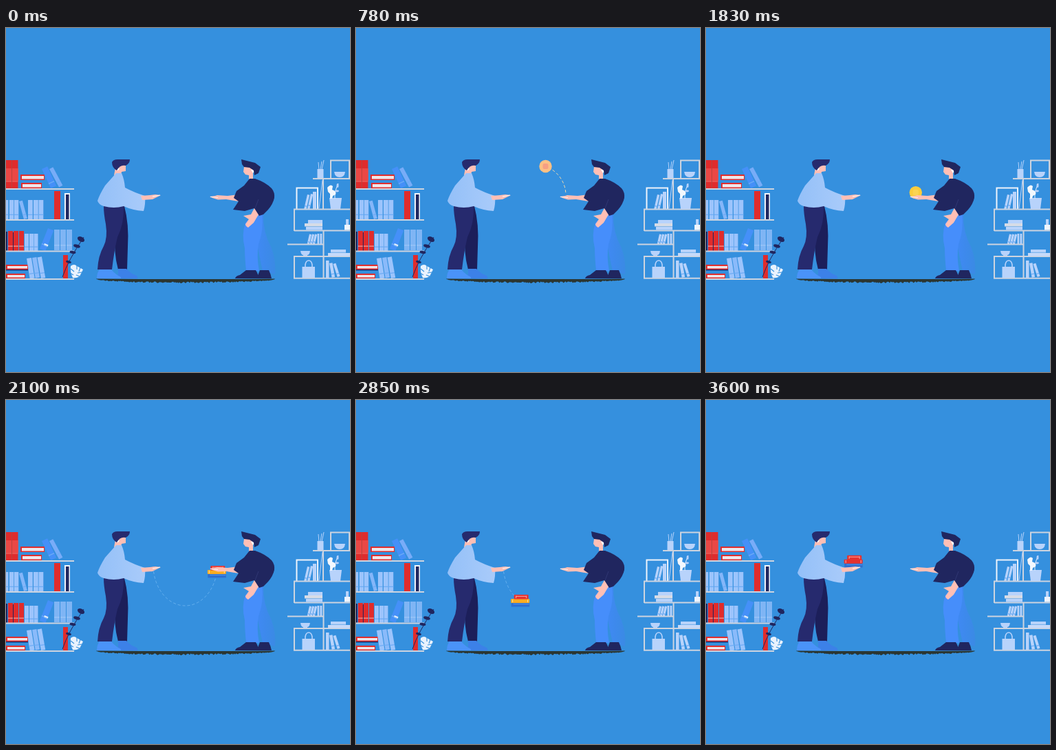
An HTML page for the animation above (3.84 s loop, 500 px wide and 500 px high).

```html
<!DOCTYPE html>
<html lang="en">
<head>
<meta charset="utf-8">
<title>Exchange</title>
<style>
html, body { margin: 0; width: 100%; height: 100%; overflow: hidden; background: #3590de; }
svg { display: block; width: 100%; height: 100%; }
</style>
</head>
<body>
<svg viewBox="0 0 500 500">
  <defs>
    <linearGradient id="sweater"><stop stop-color="#94c0f8"/><stop offset="1" stop-color="#a9cbfa"/></linearGradient>
    <linearGradient id="jeans"><stop stop-color="#4089f4"/><stop offset="1" stop-color="#3a8ae4"/></linearGradient>
  </defs>

  <g id="leftShelf"></g>
  <g id="twig">
    <path d="M82 362Q90 338 113 304" fill="none" stroke="#20265f"/>
    <g fill="#20265f">
      <ellipse cx="109" cy="307" rx="5.5" ry="3.5" transform="rotate(30 109 307)"/>
      <ellipse cx="103" cy="317" rx="5" ry="2.3" transform="rotate(15 103 317)"/>
      <ellipse cx="97" cy="326" rx="4.5" ry="2" transform="rotate(10 97 326)"/>
      <ellipse cx="91" cy="340" rx="4" ry="1.8" transform="rotate(15 91 340)"/>
    </g>
    <path d="M94 346Q99 342 103 346L112 351Q109 357 107 361 102 364 97 363 93 355 94 346Z" fill="#e9f2fd"/>
    <path d="M94 350 99 354M93 356 98 359M103 345 103 351M108 348 106 354M110 355 104 356M107 361 102 359" fill="none" stroke="#3590de" stroke-width="1.1"/>
  </g>

  <g id="rightShelf"></g>
  <g id="plant" fill="#b8d3fb">
    <path d="M470 247H488L486 263H472Z"/>
    <path d="M478 248Q477 238 483 226M473 248Q476 240 470 234" fill="none" stroke="#e9f2fd"/>
    <path d="M467 232Q472 226 475 230L474 235Q481 237 479 242L475 244 474 248 471 248 471 241 468 238Z" fill="#f3f8fe"/>
    <ellipse cx="482" cy="229" rx="1.5" ry="3"/><ellipse cx="481" cy="237" rx="3" ry="1.4"/>
  </g>

  <path id="ground" fill="#2b3632"/>

  <g id="receiver">
    <path d="M157 259H172Q179 285 177 318L176 351H163Q156 325 159 300Z" fill="#1c1f5a"/>
    <path d="M163 350H175Q181 357 190 360 192 362 191 364H163Z" fill="#3c81e8"/>
    <path d="M142 259H171Q172 284 162 304 157 325 154 351H133Q134 331 142 317 148 305 145 285 142 270 142 259Z" fill="#262a6e"/>
    <path d="M136 351H153Q160 359 167 362V364H132Q132 356 136 351Z" fill="#4a93f9"/>
    <path d="M160 198H174L174 208 168 209 167 214 157 214Z" fill="#ffbfb5"/>
    <path d="M160 202 165 204 163 207 160 206Z" fill="#fff"/>
    <path d="M154 195Q156 191 162 191H180Q180 197 174 200 166 198 161 207 154 203 154 195Z" fill="#262a6e"/>
    <path d="M160 211 168 211Q172 220 173 232 186 239 202 244 203 256 200 266 184 265 171 259 157 263 142 259 134 256 133 251 136 242 144 229 153 216Z" fill="url(#sweater)"/>
  </g>
  <g id="giver">
    <path d="M367 270H374Q373 296 386 320 393 340 391 358L373 353 364 310Z" fill="url(#jeans)"/>
    <path d="M348 283Q358 271 372 270 375 293 367 314 364 332 368 353H349Q347 333 347 320 342 300 348 283Z" fill="#468efb"/>
    <path d="M363 364Q367 359 369 352H382Q385 358 386 364ZM333 364Q334 360 340 359L349 352H363Q367 358 367 364Z" fill="#20265f"/>
    <path d="M346 202H360L359 211 359 221 353 220 353 214 348 213 345 209Z" fill="#ffbfb5"/>
    <path d="M356 206Q360 204 361 208L359 211Z" fill="#fff"/>
    <path d="M342 191 350 193 362 196 370 202 367 211 361 214 360 207 357 205 354 203 346 202 343 198Z" fill="#20265f"/>
    <path d="M362 260 372 264Q365 274 360 283L352 290Q348 288 348 285L353 278 345 273 356 271Z" fill="#ffbfb5"/>
  </g>

  <path id="trail" fill="none" stroke-width="1" stroke-dasharray="4 3"/>
  <g id="coin">
    <circle r="9.2"/>
    <rect id="coinMark" x="-4" y="-4" width="8" height="8" rx="2"/>
  </g>
  <g id="books">
    <path d="M-13 3H13.5V8.5H-13Z" fill="#2e6fd0"/>
    <path d="M-10 4.6H13" stroke="#4b93ee"/>
    <rect id="middleBook" x="-13.5" y="-3" width="27" height="6" rx="1"/>
    <path d="M-11-2V2M11-2V2" stroke="#fff" stroke-opacity=".6"/>
    <rect x="-9" y="-9" width="21" height="6.5" rx="1" fill="#e5322f"/>
    <path d="M-6-6.7H9M-6-7.5V-4M9-7.5V-4" stroke="#ffb3a8" stroke-width=".9"/>
  </g>

  <g id="hands" fill="#ffbfb5">
    <path d="M196 244 209 243 217 242 225 243 221 245 213 249 198 250Z"/>
    <path d="M213 245 224 243" stroke="#fff" stroke-width=".9"/>
    <path d="M338 242 322 244 307 243 304 244 296 245 300 247 308 249.5 320 249 338 252Z"/>
    <path d="M297 245.4 308 246.5" stroke="#fff" stroke-width=".8"/>
  </g>
  <path d="M354 219 362 219Q377 224 386 233 391 239 390 247 388 256 381 264L374 271 368 273 361 262 347 266 330 264 338 252 331 247 335 237 346 229Z" fill="#20265f"/>
  <path d="M362 262 367 249" stroke="#343b78" stroke-width=".8"/>
</svg>

<script>
const LOOP = 3840;
const RED = '#e02c2c', BLUE = '#4590f8', SKY = '#9cc4fc', PALE = '#b8d3fb', RAIL = '#cdd4df';
const $ = id => document.getElementById(id);

const rect = (x, y, w, h, fill, more = '') =>
  `<rect x="${x}" y="${y}" width="${w}" height="${h}" fill="${fill}" ${more}/>`;
const line = (d, stroke = RAIL, width = 2) =>
  `<path d="${d}" fill="none" stroke="${stroke}" stroke-width="${width}"/>`;
const spine = (x, y, w, h, fill, band = '#6eacf5') =>
  rect(x, y, w, h, fill) + rect(x, y + h * .74, w, 1.3, band);
const leaning = (x, y, w, h, angle, fill) =>
  `<g transform="translate(${x} ${y}) rotate(${angle})">${spine(0, 0, w, h, fill)}</g>`;
const lying = (x, y, w, h) =>
  rect(x, y, w, h, RED) + rect(x + 2, y + 2, w - 3, h - 3.5, '#f0e6ea');
const row = (xs, y, w, h, fill, band) => xs.map(x => spine(x, y, w, h, fill, band)).join('');

$('leftShelf').innerHTML =
  row([0, 9], 192, 8.5, 41, RED, '#f06a64') + rect(0, 204, 18, 18, '#ee5550', 'opacity=".7"') + rect(8, 192, 1, 41, '#b8433f') +
  lying(21, 213, 35, 8) + lying(22, 225, 30, 8) +
  leaning(52, 205, 9, 31, -25, BLUE) + leaning(63, 205, 6, 30, -28, '#78acf8') +
  row([-3, 5, 12], 250, 6.3, 28, SKY) + leaning(19, 252, 5, 27, -15, '#84b6f9') +
  row([32, 40, 47.5], 250, 6.8, 28, SKY) +
  rect(70, 237, 9, 41, RED) + rect(85, 240, 8, 38, '#f2f5fb') + rect(87, 242, 4.5, 36, '#20265f') +
  rect(0, 296, 2, 28, '#20265f') + row([3, 11, 19], 295, 7, 29, RED, '#f49a94') + rect(10, 297, 1, 27, '#20265f') +
  row([27, 34, 40.5], 299, 6, 25, SKY) +
  leaning(61, 291, 9, 32, 22, BLUE) + leaning(56, 313, 6, 3, 22, '#e2edfc') +
  row([70, 79, 88], 293, 8, 30, '#7fb5f4', '#9bc6f8') +
  lying(0, 344, 32, 7) + rect(0, 351, 32, 1.4, '#20265f') + lying(0, 357, 28, 7) +
  leaning(30, 335, 7, 30, -9, SKY) + leaning(38, 334, 6.5, 30, -9, '#8abafa') + leaning(45.5, 333.5, 6.5, 31, -10, SKY) +
  rect(83, 330, 7, 34, RED) +
  [234, 279, 324.5, 365].map(y => line(`M0 ${y}H99`)).join('');

$('rightShelf').innerHTML =
  rect(452.5, 205, 9, 13, PALE) + line('M455 206 454 195M457 206 459 194M459 206 462 192', PALE, 1) +
  `<path d="M477 209H493Q492 217 485 217T477 209Z" fill="${PALE}"/>` +
  line('M472 219V192.5H499V219') + line('M446 219H500M461 219V263') +
  line('M422.5 263V232.5H453V263', '#eef4fc') +
  [[438, 242], [443, 241]].map(([x, y]) => leaning(x, y, 3.4, 22, 13, PALE)).join('') + rect(446, 238, 5, 25, PALE) +
  line('M455 262 460 221', PALE, 1) +
  line('M419 295V263.5H500M419 294.5H500') +
  rect(439, 279, 21, 5, PALE) + rect(434, 284, 26, 4.5, '#d7dce6') + rect(436, 289, 24, 4.5, PALE) +
  rect(492, 286, 8, 7.5, '#eef4fc') + rect(494, 278, 4, 8, PALE) +
  [441, 445, 449].map(x => leaning(x, 299.5, 3.2, 14.5, 13, PALE)).join('') + rect(452.5, 299, 2.8, 15, PALE) + rect(456.5, 299, 2.8, 15, PALE) +
  line('M409 314.5H461M461.5 295V364M419 364V332H500M418 363.8H500') +
  `<path d="M428 324H442Q441 330 438 330V331H432V330Q429 330 428 324Z" fill="${PALE}"/>` +
  rect(472, 322, 22, 4.5, PALE) + rect(468, 327, 32, 4.5, '#c6dafa') +
  rect(430.5, 347, 18.5, 16, PALE) + line('M435 352V344Q436 338 440 338T445 344V352', PALE, 1.6) +
  rect(465, 338, 4.5, 25, PALE) + leaning(470, 342, 4.5, 21, -10, PALE) + leaning(475.5, 343, 4, 20, -18, PALE);

// Flat on top, with a ragged lower edge
let edge = 'M131 364.5Q260 365.5 391 364.5';
for (let x = 390; x > 131; x -= 1.5) {
  const depth = 5 * Math.sqrt(1 - ((x - 261) / 130) ** 2);
  const noise = Math.abs(Math.sin(x * 12.9898) * 43758.5453) % 1;
  edge += `L${x} ${(364.8 + depth * (.75 + noise * .5)).toFixed(1)}`;
}
$('ground').setAttribute('d', edge + 'Z');

// Negative radii run the half-turn from right to left underneath
const coinArc = { cx: 259, cy: 243, a: 46, b: 45, from: 8, to: 175, end: 175, begin: 0, finish: 1350 };
const bookArc = { cx: 260.5, cy: 240, a: -46.5, b: -59, from: -3, to: 185, end: 178, begin: 1830, finish: 3540 };

const clamp = v => Math.min(1, Math.max(0, v));
const span = (t, a, b) => clamp((t - a) / (b - a));
const ease = u => u * u * (3 - 2 * u);
const mix = (c, d, u) => `rgb(${c.map((v, i) => Math.round(v + (d[i] - v) * u))})`;
const pointOn = (arc, deg) => {
  const r = deg * Math.PI / 180;
  return [arc.cx - arc.a * Math.cos(r), arc.cy - arc.b * Math.sin(r)];
};

function travel(el, arc, t, opacity) {
  const deg = arc.from + (arc.to - arc.from) * ease(span(t, arc.begin, arc.finish));
  const [x, y] = pointOn(arc, deg);
  el.setAttribute('transform', `translate(${x} ${y})`);
  el.setAttribute('opacity', opacity);
  return deg;
}

function draw(t) {
  const coinShow = span(t, 0, 240) * (1 - span(t, 1830, 2010));
  const bookShow = span(t, 1830, 2010);
  const coinDeg = travel($('coin'), coinArc, t, coinShow);
  const bookDeg = travel($('books'), bookArc, t, bookShow);

  const gold = span(t, 450, 1350);
  $('coin').setAttribute('fill', mix([253, 184, 172], [253, 207, 62], gold));
  $('coinMark').setAttribute('fill', mix([246, 150, 138], [253, 214, 84], gold ** 2));
  $('middleBook').setAttribute('fill', mix([250, 172, 32], [229, 50, 47], span(t, 2850, 3500)));

  const first = t < bookArc.begin;
  const arc = first ? coinArc : bookArc;
  const deg = first ? coinDeg : bookDeg;
  const radii = `${Math.abs(arc.a)} ${Math.abs(arc.b)}`;
  $('trail').setAttribute('d', deg < arc.end
    ? `M${pointOn(arc, arc.end)}A${radii} 0 0 0 ${pointOn(arc, deg)}` : '');
  $('trail').setAttribute('stroke', first ? mix([225, 224, 230], [250, 222, 170], span(t, 450, 780)) : '#66b0ee');
  $('trail').setAttribute('opacity', first ? coinShow : bookShow);
}

function tick(now) {
  draw(now % LOOP);
  requestAnimationFrame(tick);
}
draw(0);
requestAnimationFrame(tick);
</script>
</body>
</html>
```
